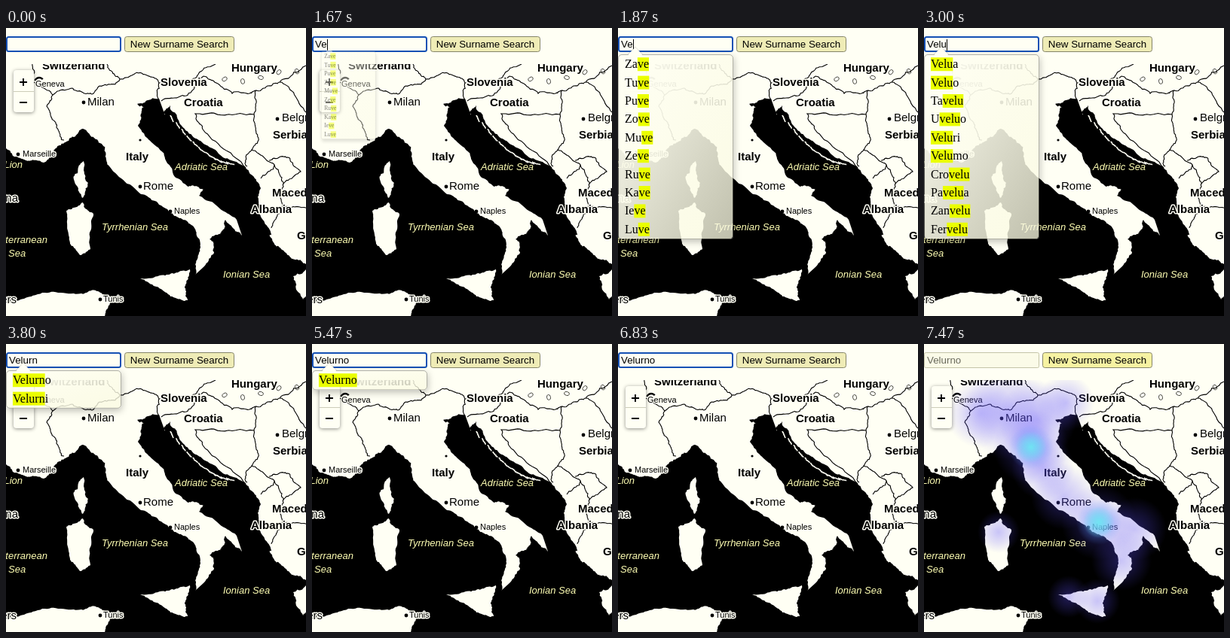
Recreate the animation shown at these times as an HTML page with a canvas. Size 398 by 383 pixels, loop 8000 ms.

```html
<!DOCTYPE html>
<html lang="en">
<head>
<meta charset="utf-8">
<title>Surname map</title>
<style>
html, body { margin: 0; width: 100%; height: 100%; overflow: hidden; background: #fffff4; }
canvas { display: block; }
</style>
</head>
<body>
<canvas id="stage" width="398" height="383"></canvas>
<script>
const W = 398, H = 383, LOOP = 8000, TOP = 48;
const PAPER = '#fffff4', INK = '#000', EDGE = 'rgba(0,0,0,.3)';
const SANS = '"Liberation Sans", Arial, sans-serif';
const SERIF = '"Liberation Serif", "Times New Roman", serif';
const ctx = document.getElementById('stage').getContext('2d');

let seed = 7;
const rand = () => (seed = (seed * 16807) % 2147483647) / 2147483647;

// A few points, roughened by midpoint displacement.
function rough(flat, amp) {
  let pts = [];
  for (let i = 0; i < flat.length; i += 2) pts.push([flat[i], flat[i + 1]]);
  for (let depth = 0; depth < 4; depth++, amp *= 0.65) {
    const next = [pts[0]];
    for (let i = 1; i < pts.length; i++) {
      const [ax, ay] = pts[i - 1], [bx, by] = pts[i];
      const d = Math.min(amp, Math.hypot(bx - ax, by - ay) * 0.2);
      const off = () => (rand() - 0.5) * 2 * d;
      next.push([(ax + bx) / 2 + off(), (ay + by) / 2 + off()], pts[i]);
    }
    pts = next;
  }
  return pts;
}

function trace(c, pts) {
  c.beginPath();
  pts.forEach(([x, y]) => c.lineTo(x, y));
}

function layer() {
  const cv = document.createElement('canvas');
  cv.width = W;
  cv.height = H;
  const c = cv.getContext('2d');
  c.fillStyle = PAPER;
  return [cv, c];
}

function clipMap(c) {
  c.beginPath();
  c.rect(0, TOP, W, H);
  c.clip();
}

function drawSea(c) {
  const west = [0, 160, 24, 175, 50, 179, 71, 156, 86, 146, 102, 134, 127, 154, 134, 181, 179, 221, 218, 246, 246, 262, 258, 292, 251, 328];
  const south = [263, 317, 276, 299, 270, 281, 286, 270, 291, 255, 313, 276];
  const adriatic = [306, 255, 256, 223, 262, 214, 242, 211, 224, 198, 202, 159, 175, 130, 183, 105, 174, 101, 203, 94];
  const balkans = [211, 116, 218, 103, 233, 130, 264, 155, 316, 184, 338, 213, 336, 247, 359, 288, 379, 307, W, 314];
  const greece = [W, 321, 381, 330, 394, 361, W, 357];
  const africa = [131, H, 142, 359, 119, 349, 100, 353, 48, 352, 0, 366];
  const sea = [west, south, adriatic, balkans, greece].flatMap(p => rough(p, 3));
  trace(c, [...sea, [W, H], ...rough(africa, 2)]);
  c.fillStyle = INK;
  c.fill();
}

function drawIslands(c) {
  const corsica = [103, 177, 109, 206, 101, 226, 90, 197, 103, 177];
  const sardinia = [80, 243, 102, 232, 116, 247, 112, 294, 98, 302, 85, 286, 80, 243];
  const sicily = [178, 333, 215, 328, 244, 321, 237, 345, 241, 362, 215, 354, 178, 333];
  c.fillStyle = c.strokeStyle = PAPER;
  for (const p of [corsica, sardinia, sicily]) {
    trace(c, rough(p, 2.5));
    c.fill();
  }
  c.lineWidth = 3;
  trace(c, rough([351, 275, 360, 290], 1));
  c.stroke();
  // Islets along the Dalmatian coast.
  c.lineWidth = 1.6;
  for (let i = 0; i < 11; i++) {
    const x = 218 + i * 7.4, y = 116 + 62 * Math.sin(i * .15);
    trace(c, rough([x, y, x + 4 + i * .7, y + 9 - i * .5], 1));
    c.stroke();
  }
}

function drawBorders(c) {
  const alps = [
    [35, 48, 36, 72, 62, 89, 88, 80, 114, 88, 134, 76, 151, 68],
    [62, 89, 54, 104, 67, 132, 77, 149],
    [134, 48, 151, 68, 180, 60, 203, 73, 203, 96],
    [203, 73, 246, 70, 278, 48]
  ];
  const east = [
    [206, 97, 245, 86, 262, 64, 300, 87, 332, 83, 363, 72, W, 50],
    [318, 186, 262, 136, 251, 114, 329, 115, 334, 151, 318, 171, 320, 184],
    [332, 83, 329, 115],
    [326, 162, 356, 182, 338, 200],
    [349, 176, 374, 172, 391, 191, 368, 207, 356, 182],
    [368, 207, 368, 236, W, 239],
    [368, 236, 352, 266],
    [363, 72, W, 112]
  ];
  c.strokeStyle = INK;
  c.lineWidth = 1.1;
  for (const p of [...alps, ...east]) {
    trace(c, rough(p, 3.5));
    c.stroke();
  }
  c.lineWidth = .7;
  for (let x = 290; x < W; x += 24) {
    c.beginPath();
    c.ellipse(x, 64 + 7 * Math.cos(x), 2.5, 3.5, x, 0, 7);
    c.stroke();
  }
  c.lineWidth = 2.5;
  c.beginPath();
  c.arc(44, 72, 6, 3.5, 5.6);
  c.stroke();
}

function label(c, text, x, y, font, fg, edge, align) {
  c.font = font + ' ' + SANS;
  c.textAlign = align;
  c.lineJoin = 'round';
  c.lineWidth = 3;
  c.strokeStyle = edge;
  c.strokeText(text, x, y);
  c.fillStyle = fg;
  c.fillText(text, x, y);
}

function drawLabels(c) {
  const land = (font, t, x, y, align = 'left') => label(c, t, x, y, font, INK, PAPER, align);
  const country = (...a) => land('bold 15px', ...a);
  const city = (...a) => land('15px', ...a);
  const town = (...a) => land('11px', ...a);
  const water = (t, x, y, align = 'left') => label(c, t, x, y, 'italic 13px', '#ffffb4', INK, align);
  const dot = (x, y, r = 2.4) => {
    c.beginPath();
    c.arc(x, y, r, 0, 7);
    c.fillStyle = INK;
    c.fill();
  };
  country('Switzerland', 48, 55);
  country('Hungary', 299, 58);
  country('Slovenia', 205, 77);
  country('Croatia', 236, 104);
  country('Serbia', 354, 147);
  country('Italy', 159, 176);
  country('Macedonia', 353, 224);
  country('Albania', 325, 246);
  country('Greece', 386, 281);
  city('Milan', 108, 103);
  city('Rome', 182, 215);
  city('Belgrade', 366, 124);
  city('Barcelona', 16, 231, 'right');
  city('Algiers', 14, 366, 'right');
  town('Geneva', 39, 78);
  town('Marseille', 22, 171);
  town('Naples', 223, 247);
  town('Tunis', 129, 364);
  water('Gulf of Lion', 22, 186, 'right');
  water('Mediterranean', 55, 286, 'right');
  water('Sea', 3, 304);
  water('Adriatic Sea', 224, 189);
  water('Tyrrhenian Sea', 127, 269);
  water('Ionian Sea', 288, 332);
  dot(103, 99);
  dot(178, 211);
  dot(218, 244);
  dot(16, 168);
  dot(125, 361);
  dot(360, 121);
  dot(178, 149, 1.6);
}

function drawMap() {
  const [cv, c] = layer();
  c.fillRect(0, 0, W, H);
  clipMap(c);
  drawSea(c);
  drawIslands(c);
  drawBorders(c);
  drawLabels(c);
  return cv;
}

function drawHeat() {
  const [cv, c] = layer();
  clipMap(c);
  const blob = (x, y, r, rgb = '95,80,255', a = .34) => {
    const g = c.createRadialGradient(x, y, 0, x, y, r);
    g.addColorStop(0, `rgba(${rgb},${a})`);
    g.addColorStop(.5, `rgba(${rgb},${a * .55})`);
    g.addColorStop(1, `rgba(${rgb},0)`);
    c.fillStyle = g;
    c.fillRect(x - r, y - r, 2 * r, 2 * r);
  };
  blob(75, 92, 46);
  blob(112, 92, 62);
  blob(150, 100, 52);
  blob(188, 78, 38);
  blob(158, 165, 42);
  blob(186, 203, 44);
  blob(280, 246, 42);
  blob(262, 288, 40);
  blob(192, 336, 28);
  blob(230, 342, 30);
  blob(99, 250, 28);
  for (const [x, y] of [[142, 137], [232, 237]]) {
    blob(x, y, 50);
    blob(x, y, 30, '90,150,255', .6);
    blob(x, y, 21, '110,240,240', .85);
  }
  return cv;
}

function box(x, y, w, h, r, fill, stroke, lw = 1) {
  ctx.beginPath();
  ctx.roundRect(x, y, w, h, r);
  ctx.fillStyle = fill;
  ctx.fill();
  if (!stroke) return;
  ctx.strokeStyle = stroke;
  ctx.lineWidth = lw;
  ctx.stroke();
}

function zoomControl() {
  ctx.save();
  ctx.shadowColor = 'rgba(0,0,0,.45)';
  ctx.shadowBlur = 5;
  ctx.shadowOffsetY = 1;
  box(10, 56, 27, 56, 4, PAPER);
  ctx.restore();
  ctx.fillStyle = '#ccccb8';
  ctx.fillRect(10, 84, 27, 1);
  ctx.fillStyle = INK;
  ctx.fillRect(18, 71, 10, 2);
  ctx.fillRect(22, 67, 2, 10);
  ctx.fillRect(18, 98, 10, 2);
}

// Value of a CSS cubic-bezier timing curve.
function bezier(x1, y1, x2, y2, x) {
  if (x <= 0) return 0;
  if (x >= 1) return 1;
  const at = (a, b, s) => 3 * a * s * (1 - s) ** 2 + 3 * b * s * s * (1 - s) + s ** 3;
  let lo = 0, hi = 1;
  for (let i = 0; i < 24; i++) {
    const mid = (lo + hi) / 2;
    if (at(x1, x2, mid) < x) lo = mid; else hi = mid;
  }
  return at(y1, y2, lo);
}

const words = s => s.split(' ');
const velu = words('Velua Veluo Tavelu Uveluo Veluri Velumo Crovelu Pavelua Zanvelu Fervelu');
const typing = [[0, ''], [530, 'V'], [1530, 'Ve'], [2370, 'Vel'], [2700, 'Velu'], [3200, 'Velur'], [3500, 'Velurn'], [4470, 'Velurno']];
const lists = [
  [1530, 've', words('Zave Tuve Puve Zove Muve Zeve Ruve Kave Ieve Luve')],
  [2430, 'vel', velu],
  [2730, 'velu', velu],
  [3230, 'velur', words('Velura Veluri Velurno Velurni Tavelur Pavelur Velurza Crovelur Zanvelur Fervelur')],
  [3500, 'velurn', words('Velurno Velurni')],
  [4570, 'velurno', ['Velurno']]
];
const carets = [[370, 800], [1300, 3800], [4270, 5100], [5630, 6000]];
const OPEN = 1568, CLOSE = 5985, SENT = 6870;
const latest = (rows, t) => rows.filter(r => r[0] <= t).pop();

function dropdown(t) {
  if (t < OPEN) return;
  const k = t < CLOSE
    ? bezier(.4, .2, .5, 1.4, (t - OPEN) / 300)
    : 1 - bezier(.25, .1, .25, 1, (t - CLOSE) / 300);
  if (k <= 0.002) return;
  const [, query, items] = latest(lists, t);
  const row = 24.4, w = 153, h = items.length * row + 2, y = 35, tip = 22.9, r = 9.4;

  ctx.save();
  ctx.globalAlpha = Math.min(1, k);
  ctx.translate(tip, 28.1);
  ctx.scale(k, k);
  ctx.translate(-tip, -28.1);

  // Shadow only outside the translucent panel.
  ctx.save();
  ctx.beginPath();
  ctx.rect(-W, -H, 3 * W, 3 * H);
  ctx.roundRect(0, y, w, h, 4.8);
  ctx.clip('evenodd');
  ctx.shadowColor = 'rgba(0,0,0,.25)';
  ctx.shadowBlur = 9.6 * k;
  ctx.shadowOffsetX = .8;
  ctx.shadowOffsetY = 3.2;
  box(0, y, w, h, 4.8, '#fff');
  ctx.restore();

  // Gradient line for "to bottom right".
  const m = w * h / (w * w + h * h), cx = w / 2, cy = y + h / 2;
  const g = ctx.createLinearGradient(cx - h * m, cy - w * m, cx + h * m, cy + w * m);
  g.addColorStop(0, PAPER);
  g.addColorStop(1, 'rgba(250,250,225,.77)');
  box(.5, y + .5, w - 1, h - 1, 4.5, g, EDGE);

  trace(ctx, [[tip - r, y], [tip, y - r], [tip + r, y]]);
  ctx.strokeStyle = EDGE;
  ctx.stroke();
  ctx.lineTo(tip, y + r);
  ctx.fillStyle = PAPER;
  ctx.fill();

  ctx.font = '16px ' + SERIF;
  ctx.textAlign = 'left';
  const width = s => ctx.measureText(s).width;
  items.forEach((name, i) => {
    const top = y + 1 + i * row, at = name.toLowerCase().indexOf(query);
    ctx.fillStyle = '#eaff00';
    ctx.fillRect(9 + width(name.slice(0, at)), top + 3.2, width(name.slice(at, at + query.length)), 18);
    ctx.fillStyle = INK;
    ctx.fillText(name, 9, top + 17.2);
  });
  ctx.restore();
}

function form(t) {
  const sent = t >= SENT, text = latest(typing, t)[1];
  if (sent) box(.5, 11.5, 152, 20, 2, '#fbfbe8', '#c4c4a8');
  else box(1, 12, 151, 19, 2.5, PAPER, '#1450b4', 2);
  ctx.font = '13.333px ' + SANS;
  ctx.textAlign = 'left';
  ctx.fillStyle = sent ? '#6a6a5c' : INK;
  ctx.fillText(text, 4, 25.5);
  if (carets.some(([a, b]) => t >= a && t < b)) {
    ctx.fillStyle = INK;
    ctx.fillRect(Math.round(4 + ctx.measureText(text).width), 15, 1, 15);
  }
  box(157.5, 11.5, 145, 20, 3, sent ? '#f6f2a2' : '#efecb6', '#85856a');
  ctx.fillStyle = INK;
  ctx.textAlign = 'center';
  ctx.fillText('New Surname Search', 230, 26);
}

const map = drawMap(), heat = drawHeat();

function frame(now) {
  const t = now % LOOP;
  ctx.drawImage(map, 0, 0);
  ctx.globalAlpha = Math.max(0, Math.min(1, (t - 6900) / 480));
  ctx.drawImage(heat, 0, 0);
  ctx.globalAlpha = 1;
  zoomControl();
  form(t);
  dropdown(t);
  requestAnimationFrame(frame);
}
frame(performance.now());
</script>
</body>
</html>
```
